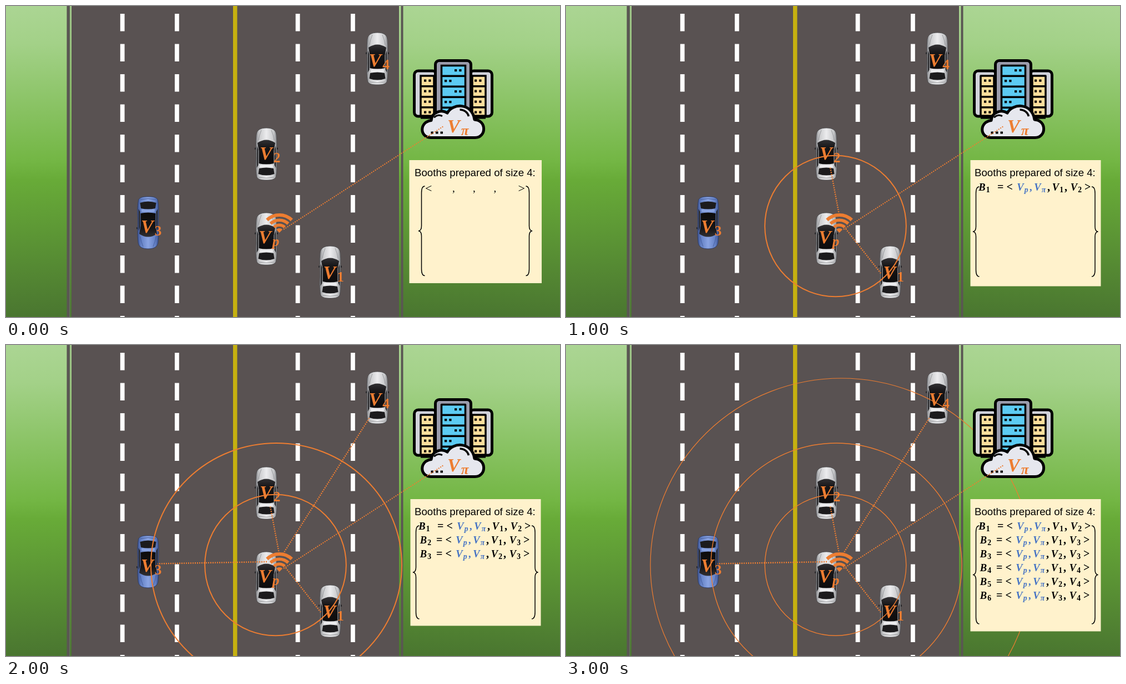
Animation of 998 by 561 pixels, one loop 4000 ms. Source, as an HTML page with a canvas:

```html
<!DOCTYPE html>
<html lang="en">
<head>
<meta charset="utf-8">
<title>Booth preparation</title>
<style>
html, body { margin: 0; width: 100%; height: 100%; overflow: hidden; }
canvas { display: block; width: 998px; height: 561px; }
</style>
</head>
<body>
<canvas id="stage" width="998" height="561"></canvas>
<script>
const ctx = document.getElementById('stage').getContext('2d');
const W = 998, H = 561, STEP = 1000;
const ORANGE = '#ed7d31', BLUE = '#4472c4', INK = '#000';
const SERIF = '"Liberation Serif", "Noto Serif", serif';
const SANS = '"Liberation Sans", Arial, sans-serif';

function rect(x, y, w, h, fill) {
  ctx.fillStyle = fill;
  ctx.fillRect(x, y, w, h);
}

function round(x, y, w, h, r, fill, stroke, lw) {
  ctx.beginPath();
  ctx.roundRect(x, y, w, h, r);
  paint(fill, stroke, lw);
}

function paint(fill, stroke, lw) {
  if (fill) { ctx.fillStyle = fill; ctx.fill(); }
  if (stroke) { ctx.strokeStyle = stroke; ctx.lineWidth = lw; ctx.stroke(); }
}

function poly(points, fill) {
  ctx.beginPath();
  points.forEach(([x, y]) => ctx.lineTo(x, y));
  ctx.closePath();
  paint(fill);
}

function text(str, x, y, font, fill) {
  ctx.font = font;
  ctx.fillStyle = fill;
  ctx.fillText(str, x, y);
}

function blend(x0, y0, x1, y1, ...stops) {
  const g = ctx.createLinearGradient(x0, y0, x1, y1);
  stops.forEach(([at, color]) => g.addColorStop(at, color));
  return g;
}

// Bold italic letter with a subscript; digits stay upright.
function symbol(letter, sub, x, y, size, color) {
  const slant = /\d/.test(sub) ? '' : 'italic ';
  text(letter, x - size * 0.09, y, `italic bold ${size}px ${SERIF}`, color);
  text(sub, x + size * 0.64, y + size * 0.16, `${slant}bold ${size * 0.74}px ${SERIF}`, color);
}

function scenery() {
  rect(0, 0, W, H, blend(0, 0, 0, H, [0, '#abd593'], [0.12, '#a3d188'],
    [0.5, '#73b644'], [0.56, '#68ab38'], [1, '#4a7630']));
  rect(118, 0, 590, H, '#595252');
  rect(109.5, 0, 4.5, H, '#5a5653');
  rect(114, 0, 1.5, H, '#64745a');
  rect(711.5, 0, 4, H, '#5a5653');
  rect(409, 0, 7.5, H, '#c5b010');
  for (const x of [205.8, 304, 521.7, 621])
    for (let y = 14; y < H; y += 54.5) rect(x, y, 7.8, 31.5, '#fff');
}

function car(x, y, blue) {
  const [edge, mid, light, trim] = blue
    ? ['#3c528f', '#6380c5', '#8aa4e2', '#2b3a66']
    : ['#85868a', '#c9cacc', '#ececee', '#4b4b4d'];
  ctx.save();
  ctx.translate(x, y);
  if (blue) ctx.rotate(Math.PI);
  for (const s of [-1, 1])
    poly([[s * 17, -13], [s * 21, -11], [s * 21, -8], [s * 17, -9]], '#252528');

  ctx.beginPath();
  ctx.moveTo(0, -47);
  ctx.bezierCurveTo(10, -47, 17, -44, 18, -35);
  ctx.bezierCurveTo(20, -20, 18, -8, 18.5, 8);
  ctx.bezierCurveTo(19.5, 22, 19, 34, 17, 42);
  ctx.bezierCurveTo(13, 47, 7, 47, 0, 47);
  ctx.bezierCurveTo(-7, 47, -13, 47, -17, 42);
  ctx.bezierCurveTo(-19, 34, -19.5, 22, -18.5, 8);
  ctx.bezierCurveTo(-18, -8, -20, -20, -18, -35);
  ctx.bezierCurveTo(-17, -44, -10, -47, 0, -47);
  paint(blend(-19, 0, 19, 0, [0, edge], [0.16, mid], [0.5, light], [0.84, mid], [1, edge]), trim, 0.9);

  // hood creases
  ctx.beginPath();
  for (const s of [-1, 1]) {
    ctx.moveTo(s * 9, -43);
    ctx.quadraticCurveTo(s * 13, -34, s * 14, -25);
  }
  paint(null, edge, 0.7);

  // side windows, windshield and roof
  for (const s of [-1, 1])
    poly([[s * 17, -15], [s * 14.5, -8], [s * 14.5, 20], [s * 17.3, 25]], '#29292c');
  ctx.beginPath();
  ctx.moveTo(-16, -20);
  ctx.quadraticCurveTo(0, -31, 16, -20);
  ctx.lineTo(13.5, -6);
  ctx.lineTo(13.5, 17);
  ctx.quadraticCurveTo(0, 20, -13.5, 17);
  ctx.lineTo(-13.5, -6);
  ctx.closePath();
  paint(blend(0, -27, 0, 19, [0, '#343336'], [0.35, '#171618'], [1, '#0c0b0c']));
  round(-12, 19.5, 24, 5, 2, light);

  // rear window
  ctx.beginPath();
  ctx.moveTo(-13, 26);
  ctx.quadraticCurveTo(0, 23, 13, 26);
  ctx.lineTo(14.5, 36);
  ctx.quadraticCurveTo(0, 41, -14.5, 36);
  ctx.closePath();
  paint('#1c1b1d');
  ctx.beginPath();
  ctx.moveTo(-14, 42);
  ctx.quadraticCurveTo(0, 45, 14, 42);
  paint(null, edge, 0.8);
  ctx.restore();
}

function dots(x, y) {
  rect(x, y, 4.2, 4.2, INK);
  rect(x + 8.3, y, 4.2, 4.2, INK);
}

function sideTower(x, panel, dotX) {
  round(x, 117, 40, 82, 7, '#d2d3db', INK, 5);
  rect(panel, 127, 24, 70, '#fddf9c');
  for (let i = 0; i < 4; i++) {
    rect(panel, 143 + i * 19, 24, 3.6, INK);
    dots(dotX, 132.5 + i * 19);
  }
  ctx.beginPath();
  ctx.rect(panel, 126, 24, 72);
  paint(null, INK, 3.5);
}

function servers() {
  sideTower(735.5, 747, 753);
  sideTower(835.5, 840, 844);
  round(773.5, 98.5, 64, 103, 7, '#9b9cac', INK, 5);
  rect(784.5, 108, 43, 92, '#5ccbf3');
  for (let i = 0; i < 4; i++) {
    rect(784.5, 124.5 + i * 19, 43, 3.6, INK);
    dots(i % 2 ? 790 : 808, 114 + i * 19);
  }
  ctx.beginPath();
  ctx.rect(784.5, 107.5, 43, 92);
  paint(null, INK, 3.5);

  // cloud
  ctx.beginPath();
  ctx.moveTo(765, 237.5);
  ctx.bezierCurveTo(745, 237, 744, 209, 766, 206.5);
  ctx.bezierCurveTo(767, 191, 785, 186, 795, 193);
  ctx.bezierCurveTo(804, 175, 840, 174, 844, 205);
  ctx.bezierCurveTo(866, 206, 866, 237, 845, 237.5);
  ctx.closePath();
  ctx.lineJoin = 'round';
  paint('#e6e7ee', INK, 5);
  ctx.beginPath();
  ctx.arc(818, 203, 16, -1.6, -0.25);
  paint(null, INK, 3.5);
  ctx.beginPath();
  ctx.arc(780, 208, 11, -2.5, -1);
  paint(null, INK, 3);
  for (let i = 0; i < 3; i++) rect(765.5 + i * 8.5, 226.5, 4.5, 4, INK);
}

function dotted(x0, y0, x1, y1, lw) {
  ctx.save();
  ctx.setLineDash([2, 2]);
  ctx.beginPath();
  ctx.moveTo(x0, y0);
  ctx.lineTo(x1, y1);
  paint(null, ORANGE, lw);
  ctx.restore();
}

function ring(x, rx, ry, lw) {
  ctx.beginPath();
  ctx.ellipse(x, 397, rx, ry, 0, 0, Math.PI * 2);
  paint(null, ORANGE, lw);
}

function wifi() {
  const x = 492.5, y = 409, up = -Math.PI / 2;
  for (const [r, lw] of [[32, 6], [22.8, 5.6], [13.8, 5.2]]) {
    ctx.beginPath();
    ctx.arc(x, y, r, up - 0.77, up + 0.77);
    paint(null, ORANGE, lw);
  }
  ctx.beginPath();
  ctx.moveTo(x, y);
  ctx.arc(x, y, 8, up - 0.77, up + 0.77);
  ctx.closePath();
  paint(ORANGE);
}

// tip: outermost x; dir: 1 opens right, -1 opens left
function brace(tip, dir, y0, y1) {
  const spine = tip + 5 * dir, end = tip + 11 * dir, mid = (y0 + y1) / 2;
  ctx.beginPath();
  ctx.moveTo(end, y0);
  ctx.quadraticCurveTo(spine, y0, spine, y0 + 12);
  ctx.lineTo(spine, mid - 9);
  ctx.quadraticCurveTo(spine, mid - 1, tip, mid);
  ctx.quadraticCurveTo(spine, mid + 1, spine, mid + 9);
  ctx.lineTo(spine, y1 - 12);
  ctx.quadraticCurveTo(spine, y1, end, y1);
  paint(null, INK, 1.5);
}

const PAIRS = ['12', '13', '23', '14', '24', '34'];

function booth(i) {
  const y = i ? 332.5 + i * 25.1 : 333, dx = i ? -2 : 0, size = 18.5;
  const sign = (s, x) => text(s, x + dx, y, `bold 20px ${SERIF}`, INK);
  symbol('B', String(i + 1), i ? 747.5 : 745, y, size, INK);
  sign('=', 777);
  sign('<', 793.5);
  symbol('V', 'p', 814 + dx, y, size, BLUE);
  text(',', 835 + dx, y, `bold 18px ${SERIF}`, BLUE);
  symbol('V', 'π', 845 + dx, y, size, BLUE);
  sign(',', 867);
  symbol('V', PAIRS[i][0], 877.5 + dx, y, size, INK);
  sign(',', 898);
  symbol('V', PAIRS[i][1], 910.5 + dx, y, size, INK);
  sign('>', 934);
}

function panel(phase) {
  const bottom = [500, 505.5, 506.5, 516.5][phase];
  if (phase) rect(728.5, 278, 235, bottom - 278, '#fff2cc');
  else rect(726.5, 278, 238.5, bottom - 278, '#fff2cc');
  text('Booths prepared of size 4:', 736, 306.5, `18.67px ${SANS}`, INK);
  if (!phase) {
    brace(743.5, 1, 325, 486.5);
    brace(947.5, -1, 325, 486.5);
    const font = `22px ${SERIF}`;
    text('<', 755, 336, font, INK);
    for (const x of [804, 841, 878.5]) text(',', x, 335, `19px ${SERIF}`, INK);
    text('>', 922.5, 336, font, INK);
    return;
  }
  const end = [0, 488, 494, 503][phase];
  brace(733.5, 1, 326, end);
  brace(958, -1, 326, end);
  const rows = [0, 1, 3, 6][phase];
  for (let i = 0; i < rows; i++) booth(i);
}

function draw(phase) {
  scenery();
  car(669, 95);
  car(469, 267);
  car(469, 420);
  car(584, 480);
  car(256, 391, true);

  const label = (sub, x, y) => symbol('V', sub, x, y, 34, ORANGE);
  label('4', 656.5, 109);
  label('2', 460, 277);
  label('3', 246, 409);
  label('1', 574.5, 492);
  label('p', 458, 428);

  const lw = phase === 3 ? 1.4 : 2;
  if (phase > 2) ring(496, 344, 337, 1.2);
  if (phase > 1) ring(487, 226, 220, lw);
  if (phase > 0) ring(485.5, 127.3, 127.3, lw);

  servers();
  label('π', 798, 228);
  dotted(500, 403, 788, 217, 2);
  if (phase > 0) {
    dotted(492, 376, 476, 291, 2.4);
    dotted(504, 402, 567, 482, 2.4);
  }
  if (phase > 1) {
    dotted(470, 391, 273, 394.5, 2.4);
    dotted(497, 380, 655, 131, 2.4);
  }
  wifi();
  panel(phase);
}

const start = performance.now();
let shown = -1;

function tick() {
  const phase = Math.floor((performance.now() - start) / STEP) % 4;
  if (phase !== shown) draw(shown = phase);
  requestAnimationFrame(tick);
}
tick();
</script>
</body>
</html>
```
